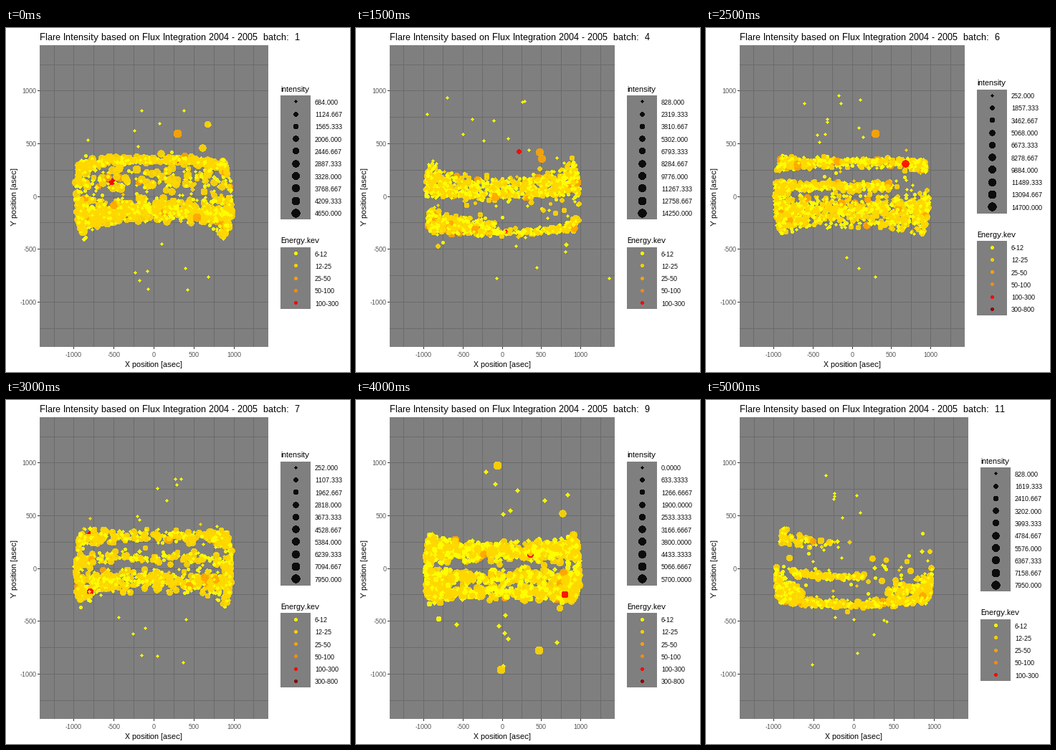
A matplotlib script for the animation above (5.5 s loop, 480 px wide and 480 px high).

```python
import numpy as np
import matplotlib.pyplot as plt
from matplotlib.animation import FuncAnimation
from matplotlib.patches import Rectangle
from matplotlib.path import Path

plt.rcParams.update({"font.family": "Liberation Sans",
                     "text.hinting": "native", "text.hinting_factor": 1})

W = H = 480
DPI = 72
LEFT, TOP, BOTTOM = 47, 24, 445
MID_Y, Y_SCALE, LIMIT = 235, 0.1472, 1430
KEY = 17.28
GREY, GRID, TICK, TICK_TEXT = "#7F7F7F", "#6B6B6B", "#333333", "#4D4D4D"
COLORS = np.array(["#FFFF00", "#FFD700", "#FFA500", "#FF8C00", "#FF0000", "#8B0000"])
LEVELS = ["6-12", "12-25", "25-50", "50-100", "100-300", "300-800"]
CIRCLE = Path.circle(radius=0.5)
DIAMOND = Path([(0, 0.5), (0.5, 0), (0, -0.5), (-0.5, 0), (0, 0.5)])


def batch(lo, hi, levels, tilt, *bands, weak=1, marks=()):
    """Intensity range, energy levels, axis tilt, bands as arguments of band()."""
    return dict(lo=lo, hi=hi, levels=[int(c) for c in levels], tilt=np.radians(tilt),
                bands=bands, weak=weak, marks=marks)


BATCHES = [
    batch(684, 4650, "01234", -6.5, (14.6, 1.1, 400, -88, 75), (4, 4, 200), (-14, 3, 900),
          marks=[(670, 680, 3.6, 1), (292, 592, 4.6, 2)]),
    batch(252, 5025, "0123", -6.5, (14.6, 1, 260, -86, 25), (-15, 2.2, 700),
          (-8, 2, 250, -88, 30), marks=[(665, 680, 4.2, 1)]),
    batch(900, 12750, "01235", 1, (11, 3, 550), (-12, 3, 700)),
    batch(828, 14250, "01234", 6, (11.5, 2.8, 700), (6.3, 1.2, 230, -75, 55),
          (-14.6, 1.1, 420), (-10.5, 1.8, 300, -75, -5),
          marks=[(482, 415, 4.5, 2), (510, 360, 4.5, 2), (218, 422, 2.4, 4)]),
    batch(828, 9250, "01234", 3, (11, 3, 500), (-11, 3, 700)),
    batch(252, 14700, "012345", -2, (17.5, 1.4, 520), (4, 1.2, 420, -88, 30),
          (-9, 3.2, 900), (-17, 1.8, 160), marks=[(292, 592, 4.6, 2), (683, 306, 4, 4)]),
    batch(252, 7950, "012345", -4, (15, 2, 300), (2, 1.5, 200), (-11, 3, 600)),
    batch(900, 8025, "01234", -3, (14.5, 2.2, 330), (-1.3, 0.6, 110, -45, 28),
          (-8.5, 1.8, 600), (-17, 1.1, 200, -62, 30), weak=1.4),
    batch(0, 5700, "012345", 0, (9.8, 2.6, 650), (-5, 1.8, 330), (-13.5, 2, 420), weak=2,
          marks=[(-55, 972, 4.6, 1), (-18, -959, 4.6, 1), (473, -775, 4.6, 1),
                 (801, -245, 3.8, 4)]),
    batch(684, 7350, "01234", 4, (13, 2, 220), (-9, 3, 500)),
    batch(828, 7950, "01234", 7, (20, 1.5, 70, -85, -12), (2.2, 0.8, 150, -52, 8),
          (-13.4, 1.2, 520), (-9, 2.5, 250, -90, -42), (-7, 2, 170, 25, 90)),
]

fig = plt.figure(figsize=(W / DPI, H / DPI), dpi=DPI, facecolor="white")
ax = fig.add_axes([0, 0, 1, 1])


def text(x, y, s, size, color="black", **kw):
    ax.text(x, y, s, fontsize=size, color=color, **{"va": "baseline", **kw})


def rect(x, y, w, h, color):
    ax.add_patch(Rectangle((x, y), w, h, fc=color, lw=0, antialiased=False))


def dots(x, y, size, color):
    """Pixel-centred points; small discs rasterise as diamonds."""
    small = size < 2.4
    diameter = 0.75 * (2.845 * size + 0.945) + 0.6 * small
    points = ax.scatter(np.floor(x) + 0.5, np.floor(y) + 0.5, s=diameter ** 2, c=color,
                        alpha=0.9, linewidths=0, antialiased=False, zorder=3)
    points.set_paths([DIAMOND if s else CIRCLE for s in small])


def band(rng, tilt, lat, spread, n, west=-88, east=88):
    """Flares along one latitude, seen on the tilted solar disk."""
    lon = np.radians(rng.uniform(west, east, n))
    offset = np.clip(rng.normal(0, 1, n), -2.2, 2.2)
    phi = np.radians(lat + spread * offset * (1 + 0.8 * np.sin(lon) ** 6))
    r = rng.normal(975, 9, n)
    y = np.sin(phi) * np.cos(tilt) - np.cos(phi) * np.cos(lon) * np.sin(tilt)
    return np.column_stack([r * np.cos(phi) * np.sin(lon), r * y])


def flares(b, seed):
    """Rows of x, y, size, level."""
    rng = np.random.default_rng(seed)
    spots = [band(rng, b["tilt"], *spec) for spec in b["bands"]]
    spots.append(band(rng, b["tilt"], 2, 9, 70))
    xy = rng.permutation(np.vstack(spots))
    n = len(xy)

    strong = rng.random(n) < 0.33
    hot = strong & (rng.random(n) < 0.05)
    level = np.where(strong, 1 + hot, rng.random(n) < 0.12)
    level[rng.choice(np.flatnonzero(strong), 2)] = b["levels"][:5][-1]

    intensity = np.where(hot, rng.uniform(0.4, 0.9, n) * b["hi"], rng.uniform(1400, 4300, n))
    share = np.clip((intensity - b["lo"]) / (b["hi"] - b["lo"]), 0, 1)
    size = np.where(strong, 1 + 4 * np.sqrt(share), b["weak"] + 0.9 * rng.random(n) ** 2)

    m = 14
    stray = np.column_stack([rng.normal(0, 380, m),
                             rng.uniform(430, 960, m) * rng.choice([-1, 1], m),
                             np.full(m, b["weak"]), np.zeros(m)])
    return np.vstack([np.column_stack([xy, size, level]), stray, *b["marks"]])


def draw_panel(right, mid, scale):
    rect(LEFT, TOP, right - LEFT, BOTTOM - TOP, GREY)
    for v in range(-1250, 1251, 250):
        x = np.floor(mid + v * scale)
        y = np.floor(MID_Y - v * Y_SCALE)
        rect(x, TOP, 1, BOTTOM - TOP, GRID)
        rect(LEFT, y, right - LEFT, 1, GRID)
        if v % 500 == 0:
            rect(x, BOTTOM, 1, 3, TICK)
            rect(LEFT - 3, y, 3, 1, TICK)
            text(x + 0.5, 459, str(v), 9, TICK_TEXT, ha="center")
            text(42.5, y + 4, str(v), 9, TICK_TEXT, ha="right")
    text(mid, 473, "X position [asec]", 11, ha="center")
    text(17.5, MID_Y, "Y position [asec]", 11, rotation=90, ha="right", va="center")


def draw_legend(x, top, title, labels, sizes, colors):
    text(x, top - 5.5, title, 11)
    n = len(labels)
    rect(x, round(top), 42, round(KEY * n), GREY)
    rows = top + KEY * (np.arange(n) + 0.5)
    dots(np.full(n, x + 21.2), rows, sizes, colors)
    for y, label in zip(rows, labels):
        text(x + 48, y + 4, label, 9)


def draw(i):
    ax.clear()
    ax.set(xlim=(0, W), ylim=(H, 0))
    ax.axis("off")
    b = BATCHES[i]
    steps = np.linspace(b["lo"], b["hi"], 10)
    digits = 6 - int(np.log10(steps[1]))
    labels = [f"{v:.{digits}f}" for v in steps]
    right = 366 if len(labels[-1]) < 9 else 361
    mid = (LEFT + right) / 2
    scale = (right - LEFT) / 2 / LIMIT

    text(LEFT, 17, f"Flare Intensity based on Flux Integration 2004 - 2005  batch:  {i + 1}", 13)
    draw_panel(right, mid, scale)
    x, y, size, level = flares(b, i + 1).T
    dots(mid + x * scale, MID_Y - y * Y_SCALE, size, COLORS[level.astype(int)])

    levels = b["levels"]
    top = 94.2 + KEY / 2 * (5 - len(levels))
    sizes = 1 + 4 * np.sqrt(np.linspace(0, 1, 10))
    draw_legend(right + 17, top, "intensity", labels, sizes, "black")
    draw_legend(right + 17, top + 211.8, "Energy.kev", [LEVELS[k] for k in levels],
                np.full(len(levels), 1.5), COLORS[levels])


anim = FuncAnimation(fig, draw, frames=len(BATCHES), interval=500,
                     init_func=lambda: None, repeat=True, repeat_delay=0)
plt.show()
```
